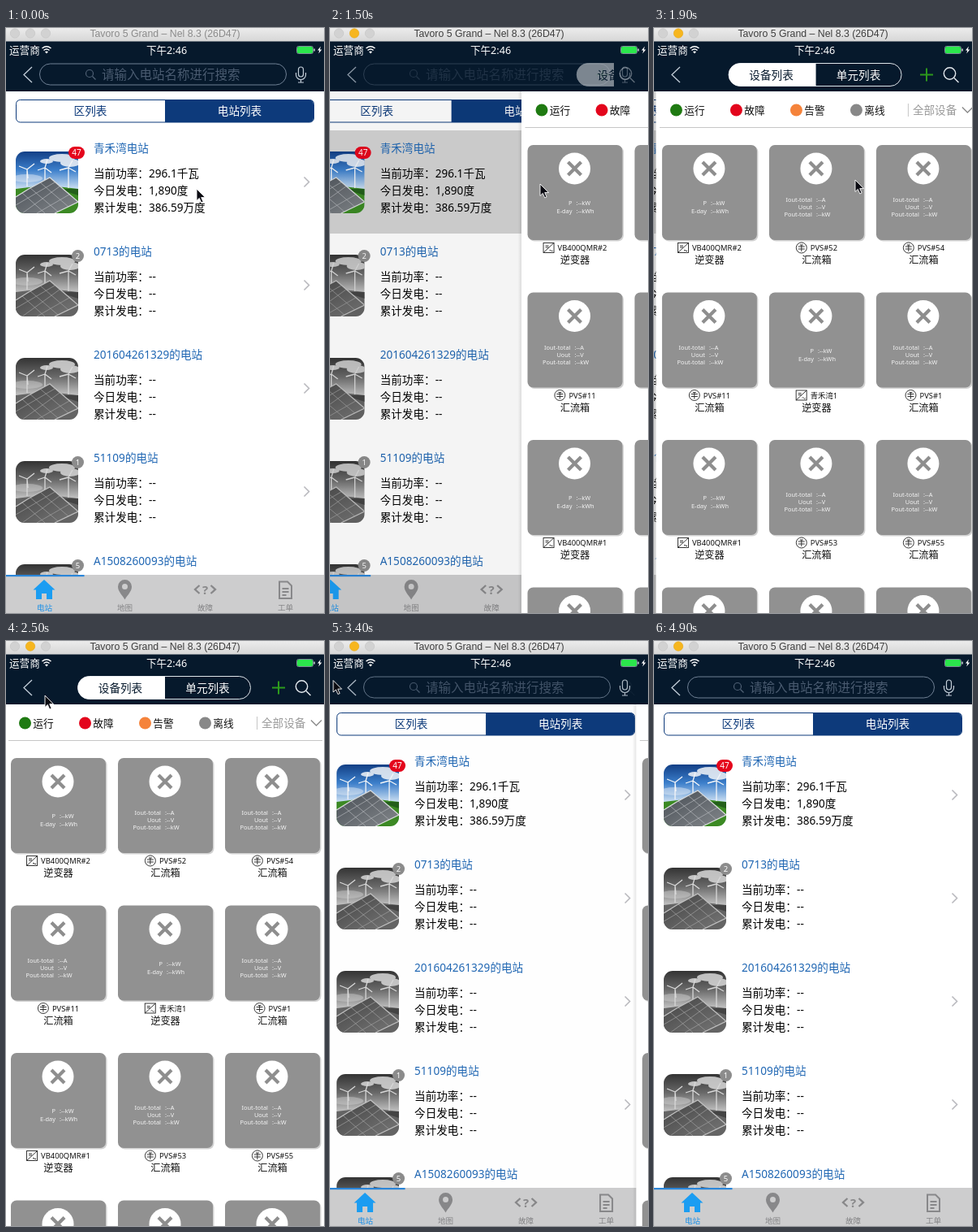
These frames come from a looping animation (392x720 px, 5 s). An HTML page:

```html
<!DOCTYPE html>
<html lang="zh-CN">
<head>
<meta charset="utf-8">
<title>电站列表</title>
<style>
  html, body { margin: 0; width: 100%; height: 100%; overflow: hidden; background: #fff; }
  svg { display: block; width: 100vw; height: 100vh; }
  text { font-family: "Noto Sans", "Noto Sans CJK SC", "Noto Sans CJK", sans-serif; white-space: pre; }
  .mid { text-anchor: middle; }
  .end { text-anchor: end; }
  .line { fill: none; }
  .grey { filter: grayscale(1) brightness(.88); }
  .bar text { font-family: "Liberation Sans", sans-serif; }
</style>
</head>
<body>
<svg id="stage" viewBox="0 0 392 720">
  <defs>
    <linearGradient id="chrome" x2="0" y2="1"><stop stop-color="#ececec"/><stop offset="1" stop-color="#d6d6d6"/></linearGradient>
    <linearGradient id="sky" x2="0" y2="1"><stop stop-color="#123f86"/><stop offset=".3" stop-color="#3c7fcb"/><stop offset=".62" stop-color="#d3e4f4"/></linearGradient>
    <linearGradient id="panel" x2="1" y2="1"><stop stop-color="#484e55"/><stop offset="1" stop-color="#83878b"/></linearGradient>
    <linearGradient id="edge"><stop stop-color="#000" stop-opacity="0"/><stop offset="1" stop-color="#000" stop-opacity=".13"/></linearGradient>
    <clipPath id="round"><rect width="77" height="76" rx="11"/></clipPath>
    <clipPath id="slot"><rect x="36" y="38" width="314" height="40"/></clipPath>
    <g id="photo" clip-path="url(#round)">
      <rect width="77" height="76" fill="url(#sky)"/>
      <g fill="#f3f6fa" opacity=".85">
        <ellipse cx="57" cy="8" rx="16" ry="5"/><ellipse cx="67" cy="14" rx="12" ry="5"/>
        <ellipse cx="38" cy="12" rx="8" ry="3"/><ellipse cx="14" cy="33" rx="19" ry="5" opacity=".5"/>
      </g>
      <path d="M0 46Q38 40 77 46V76H0Z" fill="#3c8a24"/>
      <path d="M52 46h25v8z" fill="#245f1b"/>
      <g class="line" stroke="#f4f6f8" stroke-width="1.3">
        <path d="M14 43V22M14 22L4 18M14 22l9-7M14 22l1 11M36 38V20M36 20l-9 3M36 20l3-10M36 20l8 6M65 45V20M65 20l-11 3M65 20l5-9M65 20l9 5"/>
      </g>
      <path d="M0 56L16 46 42 32 77 62 48 76H0Z" fill="url(#panel)"/>
      <path class="line" d="M8 76L54 43M26 76L66 53M0 66L48 38M8 51L36 76M18 45L52 74M30 38L65 68" stroke="#b3b7ba" stroke-width=".7"/>
      <path class="line" d="M0 56L16 46 42 32 77 62 48 76" stroke="#d9dcde" stroke-width="1.2"/>
    </g>
    <g id="inverter" class="line" stroke="#222" stroke-width=".9">
      <rect x=".5" y=".5" width="13" height="12"/>
      <path d="M.5 12.5l13-12M3 4h4M3 6h4M8 10q1-2 2 0t2 0"/>
    </g>
    <g id="combiner" class="line" stroke="#222" stroke-width=".9">
      <circle cx="7" cy="6.5" r="6.5"/><path d="M3 5h8M3 8h8M7 3v8M5 3h4"/>
    </g>
  </defs>

  <g id="list"></g>
  <rect id="dim" y="78" width="392" height="642"/>
  <g id="page"></g>

  <rect y="16" width="392" height="62" fill="#06192c"/>
  <g fill="#fff">
    <text x="4" y="32" font-size="12.6">运营商</text>
    <text class="mid" x="198" y="32" font-size="12.6">下午2:46</text>
    <path class="line" d="M44.500 25q5.500-4.500 11 0M46.500 27.500q3.500-3 7 0" stroke="#fff" stroke-width="1.500"/>
    <path d="M48 29.300q2-1.500 4 0l-2 2.300z"/>
    <rect x="358.500" y="22.500" width="20" height="9" rx="2" class="line" stroke="#7d8b99"/>
    <rect x="359" y="23" width="19" height="8" rx="1.500" fill="#2be64c"/>
    <path d="M379.500 25.500h1.200v3h-1.200zM388 22.500l-4 5h2.300l-1 4 4-5h-2.400z"/>
  </g>
  <path id="back" class="line" d="M32 48L22 57.500 32 67" stroke="#c3ced9" stroke-width="1.300"/>
  <g id="search" class="line">
    <rect x="41.500" y="44" width="304" height="26" rx="13" stroke="#6f8094"/>
    <circle cx="103" cy="56" r="4.500" stroke="#4f6074" stroke-width="1.200"/>
    <path d="M106.500 59.500l4 4" stroke="#4f6074" stroke-width="1.200"/>
    <text x="118" y="63" font-size="15.500" fill="#4a5b70">请输入电站名称进行搜索</text>
    <g stroke="#c3ced9" stroke-width="1.200">
      <rect x="360.500" y="48" width="6" height="12" rx="3"/>
      <path d="M357.500 55v2.500a6 6 0 0 0 12 0V55M363.500 63.500v3.500M360 67h7"/>
    </g>
  </g>
  <g clip-path="url(#slot)">
    <g id="tabs">
      <rect x="88.500" y="43.500" width="213" height="28" rx="14" class="line" stroke="#dfe5ea"/>
      <path d="M196 43.500H102.500a14 14 0 0 0 0 28H196z" fill="#fff"/>
      <text class="mid" x="141" y="62.500" font-size="13.600" fill="#06192c">设备列表</text>
      <text class="mid" x="248.500" y="62.500" font-size="13.600" fill="#fff">单元列表</text>
    </g>
  </g>
  <path id="plus" class="line" d="M328 57.500h16M336 49.500v16" stroke="#2d9c1c" stroke-width="2"/>
  <g id="find" class="line" stroke="#e6ebf0" stroke-width="1.400">
    <circle cx="364.500" cy="56" r="7.200"/><path d="M370 61.500l5.500 5.500"/>
  </g>

  <g class="bar">
    <rect width="392" height="16.500" fill="url(#chrome)"/>
    <g fill="#d2d2d2" stroke="#c3c3c3" stroke-width=".6">
      <circle cx="11" cy="6.500" r="5.700"/><circle id="lamp" cx="30" cy="6.500" r="5.700"/><circle cx="49" cy="6.500" r="5.700"/>
    </g>
    <text id="caption" class="mid" x="196" y="11" font-size="12.300">Tavoro 5 Grand – Nel 8.3 (26D47)</text>
  </g>
  <path id="cursor" d="M0 0v14.500l3.300-3.100 2.500 5.600 2.300-1-2.400-5.400h4.800z" fill="#0b0b12" stroke="#fff" stroke-width=".9"/>
</svg>
<script>
const $ = id => document.getElementById(id);
const text = (x, y, size, fill, str, cls = '') =>
  `<text x="${x}" y="${y}" font-size="${size}" fill="${fill}" class="${cls}">${str}</text>`;

// Station list
const stations = [
  ['青禾湾电站', 47, ['296.1千瓦', '1,890度', '386.59万度']],
  ['0713的电站', 2], ['201604261329的电站', 0], ['51109的电站', 1], ['A1508260093的电站', 5]
];
const labels = ['当前功率：', '今日发电：', '累计发电：'];

function station([name, count, values], i) {
  const badge = count > 9
    ? `<rect x="77" y="146" width="20" height="15" rx="7.500" fill="#e5061c"/>${text(87, 157, 10, '#fff', count, 'mid')}`
    : count ? `<circle cx="88.500" cy="153.500" r="7.500" fill="#8c8c8c"/>${text(88.5, 157, 9.5, '#fff', count, 'mid')}` : '';
  const facts = labels.map((l, k) => {
    const y = 184 + 21 * k;
    return text(108, y, 13.6, '#000', l) + text(176, y, 13.6, '#000', values ? values[k] : '--');
  }).join('');
  return `<g transform="translate(0 ${127 * i})">
    <use href="#photo" x="12" y="152" class="${i ? 'grey' : ''}"/>${badge}
    ${text(108, 153, 13.6, '#1f66b3', name)}${facts}
    <path class="line" d="M367.500 183.500l6 6-6 6" stroke="#b9b9be" stroke-width="1.600"/></g>`;
}

const tabBar = `<rect y="673" width="392" height="47" fill="#cdcdce"/>
  <rect y="673" width="96.500" height="2.200" fill="#2b86d9"/>
  <path d="M47 679l13.500 12.500h-3.500V703h-7v-7h-6v7h-7v-11.500h-3.500z" fill="#1b9df2"/>
  <path fill-rule="evenodd" d="M146.500 679a8.500 8.500 0 0 0-8.500 8.500c0 6 5 10 8.500 16 3.500-6 8.500-10 8.500-16a8.500 8.500 0 0 0-8.500-8.500m0 5a3.500 3.500 0 1 1 0 7 3.500 3.500 0 0 1 0-7" fill="#88888a"/>
  <path class="line" d="M238.500 686l-5.500 5 5.500 5M252.500 686l5.500 5-5.500 5" stroke="#88888a" stroke-width="2.300"/>
  <text class="mid" x="245.500" y="696.500" font-size="15" font-weight="700" fill="#88888a">?</text>
  <path class="line" d="M337 681.500h10l5 5V702h-15zM340.500 690h8M340.500 694h8M340.500 698h5" stroke="#88888a" stroke-width="2"/>` +
  ['电站', '地图', '故障', '工单'].map((s, i) =>
    text(47.5 + 99 * i, 717, 9.6, i ? '#858587' : '#1b8fe6', s, 'mid')).join('');

$('list').innerHTML = `<rect y="78" width="510" height="642" fill="#fff"/>
  <rect id="mark" y="126" width="510" height="127" fill="#d3d3d3"/>
  <path d="M196 88.500h178a5 5 0 0 1 5 5v17.500a5 5 0 0 1-5 5H196z" fill="#0d3a7b"/>
  <rect x="12.500" y="88.500" width="367" height="27.500" rx="5" class="line" stroke="#0d3a7b"/>
  ${text(104, 107, 13.6, '#0d3a7b', '区列表', 'mid')}${text(288, 107, 13.6, '#fff', '电站列表', 'mid')}
  ${stations.map(station).join('')}${tabBar}`;

// Device page
const devices = ['VB400QMR#2', 'PVS#52', 'PVS#54', 'PVS#11', '青禾湾1', 'PVS#1',
  'VB400QMR#1', 'PVS#53', 'PVS#55', 'PVS#12', 'PVS#56', 'PVS#57'];
const legend = [['#1f7a12', '运行'], ['#e3051c', '故障'], ['#f5833b', '告警'], ['#888', '离线']];

function device(code, i) {
  const box = code.startsWith('PVS');
  const rows = box
    ? [['Iout-total', ':--A', 70], ['Uout', ':--V', 79], ['Pout-total', ':--kW', 88]]
    : [['P', ':--kW', 74], ['E-day', ':--kWh', 84]];
  const edge = box ? 53 : 55;
  return `<g transform="translate(${6 + 132 * (i % 3)} ${144 + 181.5 * Math.floor(i / 3)})">
    <rect x="1.500" y="1.500" width="117" height="117" rx="7" fill="#d2d2d2"/>
    <rect width="117" height="117" rx="7" fill="#919191"/>
    <circle cx="58" cy="29" r="19.500" fill="#fff"/>
    <path class="line" d="M50 21l16 16M66 21l-16 16" stroke="#8e8e8e" stroke-width="4.200"/>
    ${rows.map(([a, b, y]) => text(edge, y, 7.4, '#f4f4f4', a, 'end') + text(edge + 5, y, 7.4, '#f4f4f4', b)).join('')}
    <use href="#${box ? 'combiner' : 'inverter'}" y="120"/>
    ${text(67.5, 130, 9.4, '#111', code, 'mid code')}
    ${text(58.5, 146, 12.2, '#111', box ? '汇流箱' : '逆变器', 'mid')}</g>`;
}

$('page').innerHTML = `<rect x="-6" y="78" width="6" height="642" fill="url(#edge)"/>
  <rect x="-1.500" y="78" width="394" height="642" fill="#fff"/>
  ${legend.map(([c, s], i) => `<circle cx="${23.5 + 74 * i}" cy="101" r="7.500" fill="${c}"/>` +
    text(33.3 + 74 * i, 106, 12.7, '#111', s)).join('')}
  <path class="line" d="M309.500 93v16M3 122.500h387" stroke="#c6c6c6"/>
  ${text(315, 106, 13.6, '#9a9a9a', '全部设备')}
  <path class="line" d="M376 97.500l6.500 6.500 6.500-6.500" stroke="#8a8a8a" stroke-width="1.400"/>
  ${devices.map(device).join('')}`;

// Keep each icon just left of its centred code
document.querySelectorAll('.code').forEach(c =>
  c.previousElementSibling.setAttribute('x', 49.5 - c.getComputedTextLength() / 2));

// Motion
const LOOP = 5000, STEP = 100, PUSH = 1397, POP = 3004;
const path = [[0, 235, 198], [900, 259, 192], [1600, 259, 192], [1900, 248, 187],
  [2500, 48, 67], [2800, 28, 55], [3200, 28, 55], [3600, -20, 42], [LOOP, -20, 42]];

// Share of a critically damped spring still to go
function rest(ms) {
  const x = Math.max(0, ms) * .0132;
  return (1 + x) * Math.exp(-x);
}

function pointer(t) {
  const k = path.findIndex(p => p[0] > t), [t0, x0, y0] = path[k - 1], [t1, x1, y1] = path[k];
  const u = (t - t0) / (t1 - t0), s = u * u * (3 - 2 * u);
  return [x0 + (x1 - x0) * s, y0 + (y1 - y0) * s];
}

const move = (id, x, y = 0) => $(id).setAttribute('transform', `translate(${x.toFixed(2)} ${y.toFixed(2)})`);
const fade = (id, a) => $(id).setAttribute('opacity', Math.max(0, Math.min(1, a)).toFixed(3));

function draw() {
  const t = Math.floor(performance.now() % LOOP / STEP) * STEP;
  const popping = t >= POP;
  let p = popping ? rest(t - POP) : 1 - rest(t - PUSH);
  if (p < .001) p = 0;
  if (p > .998) p = 1;

  move('list', -117.6 * p);
  move('page', p ? 392 * (1 - p) : 410);
  fade('dim', .11 * p);
  fade('mark', t >= 1300 && t < 2500 ? 1 : 0);

  // Bar items come back later than they leave
  fade('search', (1 - p) ** (popping ? 4 : 2));
  fade('back', 1 - (popping ? 4 : 1.3) * p * (1 - p));
  move('tabs', (popping ? 300 : 356) * (1 - p));
  fade('tabs', 1.2 * p);
  fade('find', p);
  fade('plus', p ** 3);

  const active = t >= 1200;
  $('lamp').setAttribute('fill', active ? '#f6b61f' : '#d2d2d2');
  $('lamp').setAttribute('stroke', active ? '#e5a716' : '#c3c3c3');
  $('caption').setAttribute('fill', active ? '#3f3f3f' : '#8b8b8b');
  move('cursor', ...pointer(t));
  requestAnimationFrame(draw);
}
draw();
</script>
</body>
</html>
```
